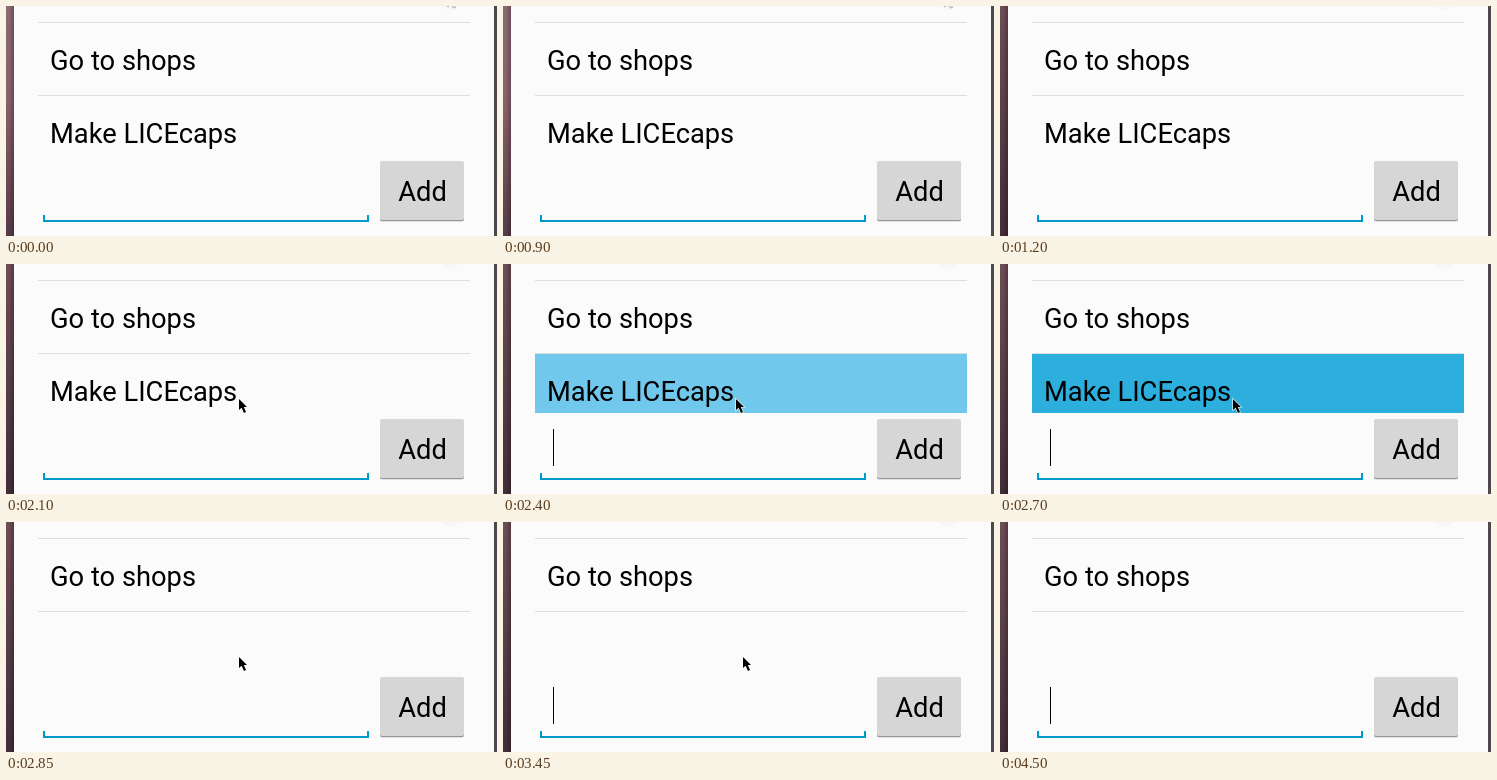
An HTML page that plays this animation: 491x230 px, repeating every 4620 ms.

```html
<!DOCTYPE html>
<html lang="en">
<head>
<meta charset="utf-8">
<title>To-do list</title>
<style>
  html, body { margin: 0; width: 100%; height: 100%; overflow: hidden; background: #fbfbfb; }
  svg { display: block; width: 491px; height: 230px; }
  text { font: 27.3px Roboto, sans-serif; fill: #000; }

  .caret, .pointer, .item, .press, .mark, .bright {
    animation: 4620ms step-end infinite;
  }
  .caret { animation-name: blink; }
  .pointer { animation-name: move; }
  .item { animation-name: remove; }
  .press { animation-name: press; }
  .mark { animation-name: mark; }
  .bright { animation-name: dim; }

  @keyframes blink {
    0%, 19.48%, 42.207%, 61.688%, 84.415% { visibility: hidden; }
    6.493%, 29.22%, 51.948%, 74.675%, 97.402%, 100% { visibility: visible; }
  }
  @keyframes move {
    0% { visibility: hidden; transform: translate(408px, 110px); }
    32.467% { visibility: visible; transform: translate(408px, 110px); }
    35.714% { visibility: visible; transform: translate(296px, 202px); }
    38.961% { visibility: visible; transform: translate(246px, 167px); }
    42.207% { visibility: visible; transform: translate(233px, 140px); }
    45.454% { visibility: visible; transform: translate(233px, 135px); }
    74.675% { visibility: visible; transform: translate(240px, 135px); }
    77.922% { visibility: visible; transform: translate(349px, 171px); }
    81.168% { visibility: visible; transform: translate(405px, 202px); }
    84.415%, 100% { visibility: hidden; transform: translate(405px, 202px); }
  }
  @keyframes remove {
    0% { opacity: 1; }
    61.688%, 100% { opacity: 0; }
  }
  @keyframes press {
    0% { fill: #fbfbfb; }
    51.948% { fill: #70c9ec; }
    55.194% { fill: #4fbce5; }
    58.441%, 100% { fill: #2dafde; }
  }
  @keyframes mark {
    0% { opacity: 1; }
    22.727%, 100% { opacity: 0; }
  }
  @keyframes dim {
    0% { opacity: 1; }
    25.974%, 100% { opacity: 0; }
  }
</style>
</head>
<body>
<svg viewBox="0 0 491 230">
  <defs>
    <linearGradient id="dark" x2="0" y2="1">
      <stop offset="0" stop-color="#6e4d56"/>
      <stop offset=".5" stop-color="#593e48"/>
      <stop offset="1" stop-color="#432d37"/>
    </linearGradient>
    <linearGradient id="light" x2="0" y2="1">
      <stop offset="0" stop-color="#8b6a72"/>
      <stop offset=".4" stop-color="#8a616a"/>
      <stop offset="1" stop-color="#573c47"/>
    </linearGradient>
    <linearGradient id="shade">
      <stop offset="0" stop-color="#000" stop-opacity="0"/>
      <stop offset="1" stop-color="#000" stop-opacity=".25"/>
    </linearGradient>
  </defs>

  <rect width="491" height="230" fill="#fbfbfb"/>
  <rect width="8" height="230" fill="url(#dark)"/>
  <rect class="bright" width="8" height="230" fill="url(#light)"/>
  <rect x="3" width="5" height="230" fill="url(#shade)"/>
  <rect x="488" width="3" height="230" fill="#4c484c"/>

  <ellipse cx="444.5" cy="0" rx="8" ry="4.5" fill="#f7f7f7"/>
  <path class="mark" d="M441 0l2 1M446 0l1.5 2 2-.5-1-1.5" fill="none" stroke="#aaa"/>

  <path d="M32 16.5H464M32 89.5H464" stroke="#dedede"/>
  <text x="44" y="64">Go to shops</text>
  <g class="item">
    <rect class="press" x="32" y="90" width="432" height="59"/>
    <text x="44" y="137">Make LICEcaps</text>
  </g>

  <path d="M38 209V215H362V209" fill="none" stroke="#0099cc" stroke-width="2"/>
  <rect class="caret" x="50" y="165" width="1" height="37" fill="#000"/>

  <rect x="374" y="156" width="84" height="60" rx="2" fill="#e2e2e2"/>
  <rect x="374" y="156" width="84" height="59" rx="2" fill="#949494"/>
  <rect x="374" y="155" width="84" height="59" rx="2" fill="#d6d6d6"/>
  <text x="392.3" y="195">Add</text>

  <path class="pointer" d="M0 0V11L2.6 8.7 5 14 7 13 4.8 8H8Z" fill="#000"
        stroke="#fff" stroke-width="1.2" paint-order="stroke"/>
</svg>
</body>
</html>
```
